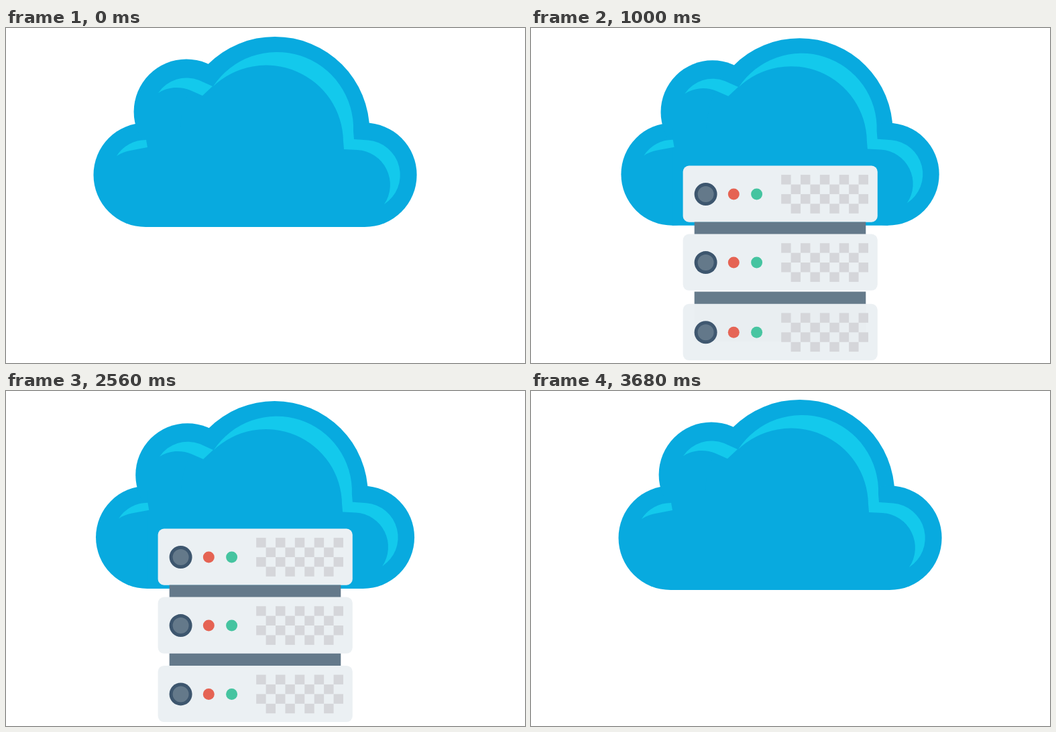
An HTML page with a canvas for the animation above (4000 ms loop, 774 by 500 pixels).

```html
<!DOCTYPE html>
<html lang="en">
<head>
<meta charset="utf-8">
<title>Cloud servers</title>
<style>
  html, body { margin: 0; width: 100%; height: 100%; overflow: hidden; background: #fff; }
  canvas { display: block; }
</style>
</head>
<body>
<canvas id="stage" width="774" height="500"></canvas>
<script>
const ctx = document.getElementById('stage').getContext('2d');
const LOOP = 4000, STEP = 40;
const TRAVEL = 120, ENTER_TIME = 900, EXIT_TIME = 340;

const SERVERS = [
  { y: 205.5, enter: 0, exit: 3340 },
  { y: 307.6, enter: 180, exit: 3182, bar: true },
  { y: 409.9, enter: 420, exit: 3020, bar: true }
];

// [time, scale] of the pulsing cloud
const PULSE = [[0, 1], [590, .945], [1170, 1], [1200, 1], [1790, .945],
               [2375, 1], [2405, 1], [3010, .943], [3620, 1], [LOOP, 1]];

const SHINE = new Path2D(
  'M309 87A114 114 0 0 1 518 154L519 166L540 167.5A52 52 0 0 1 564 263' +
  'A52 52 0 0 0 524 182L504 181L503 169A115 115 0 0 0 309 87Z' +
  'M227 97A51 51 0 0 1 288 78L308 87L293 101L275 93A52 52 0 0 0 227 97Z' +
  'M165 191A52 52 0 0 1 209 167L211 178L185 183A52 52 0 0 0 165 191Z');

const clamp = x => Math.min(1, Math.max(0, x));
const easeOut = x => 1 - (1 - x) ** 4;
const easeInOut = x => (1 - Math.cos(Math.PI * x)) / 2;

function disc(x, y, r, color) {
  ctx.fillStyle = color;
  ctx.beginPath();
  ctx.arc(x, y, r, 0, 2 * Math.PI);
  ctx.fill();
}

function box(x, y, w, h, color, r = 0) {
  ctx.fillStyle = color;
  ctx.beginPath();
  ctx.roundRect(x, y, w, h, r);
  ctx.fill();
}

function pulse(t) {
  const i = PULSE.findIndex(([end]) => t < end);
  const [t0, s0] = PULSE[i - 1], [t1, s1] = PULSE[i];
  return s0 + (s1 - s0) * (t - t0) / (t1 - t0);
}

function drawCloud(scale) {
  const blue = '#08aadf';
  ctx.save();
  ctx.translate(371.5, 155);
  ctx.scale(scale, scale);
  ctx.translate(-371.5, -155);
  disc(208.3, 219.3, 77.8, blue);
  disc(269, 125, 78.4, blue);
  disc(401, 154.2, 141.3, blue);
  disc(534.8, 219.3, 77.8, blue);
  box(208, 150, 327, 147.1, blue);
  ctx.fillStyle = '#13c9ec';
  ctx.fill(SHINE);
  ctx.restore();
}

function drawServer({ y, enter, exit, bar }, t) {
  const shown = easeOut(clamp((t - enter) / ENTER_TIME)) *
                (1 - easeInOut(clamp((t - exit) / EXIT_TIME)));
  if (shown <= 0) return;
  ctx.save();
  ctx.globalAlpha = shown;
  ctx.translate(0, y + TRAVEL * (1 - shown));
  if (bar) box(243.7, -18.2, 255.6, 74, '#64798a');
  box(226.6, 0, 290.2, 84.2, '#ebf0f3', 9);
  disc(260.6, 42.5, 17, '#3d566e');
  disc(260.6, 42.5, 12, '#64798a');
  disc(302.3, 42.5, 8.5, '#e56353');
  disc(336.6, 42.5, 8.5, '#45c4a0');
  const cell = 14.42;
  for (let row = 0; row < 4; row++)
    for (let col = row % 2; col < 9; col += 2)
      box(373.2 + col * cell, 13.6 + row * cell, cell, cell, '#d5d6da');
  ctx.restore();
}

function render(now) {
  const t = Math.floor(now % LOOP / STEP) * STEP;
  ctx.fillStyle = '#fff';
  ctx.fillRect(0, 0, 774, 500);
  drawCloud(pulse(t));
  SERVERS.forEach(server => drawServer(server, t));
}

const start = performance.now();
function tick() {
  render(performance.now() - start);
  requestAnimationFrame(tick);
}
tick();
</script>
</body>
</html>
```
